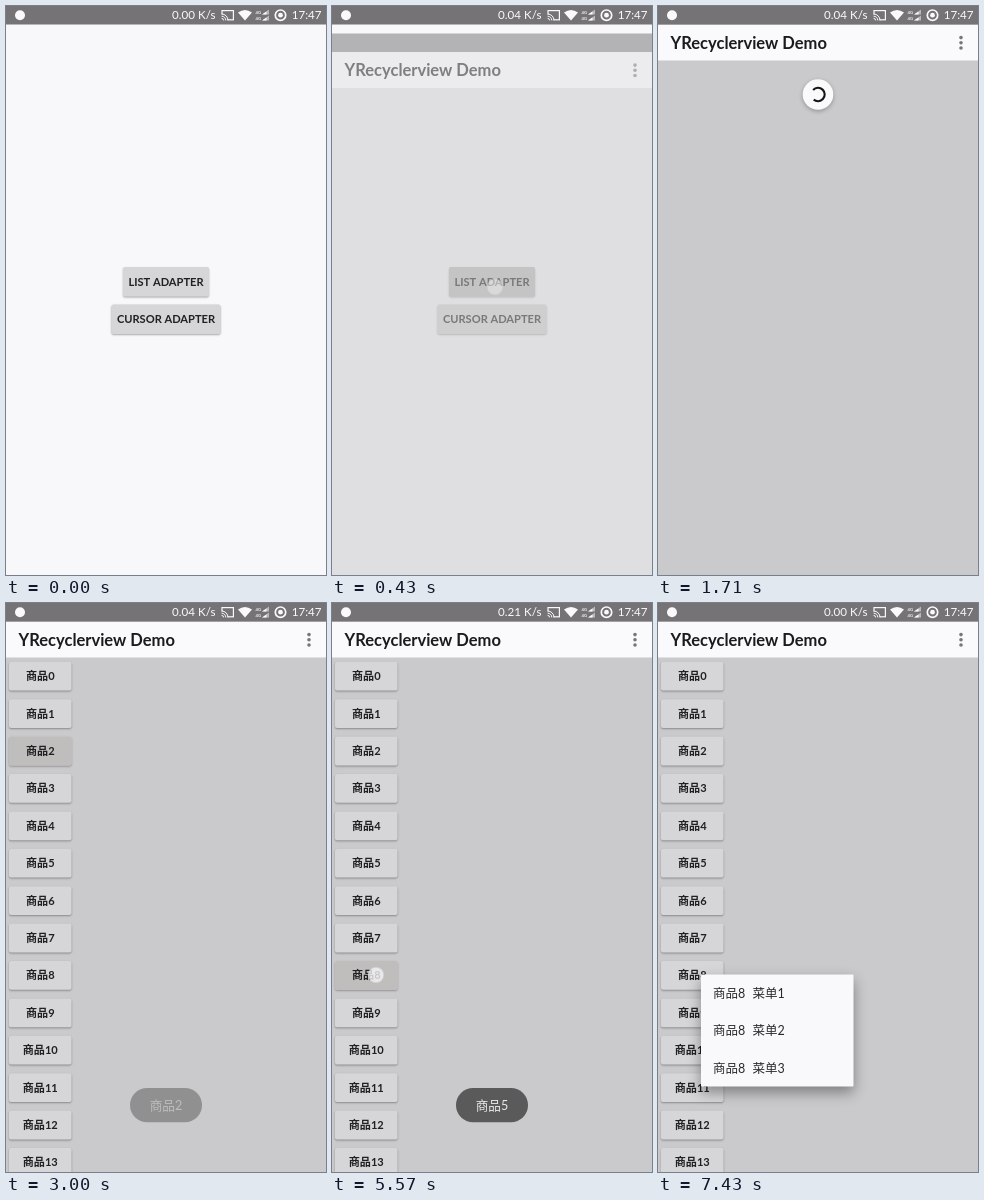
An HTML page with a canvas for the animation above (8000 ms loop, 320 by 569 pixels).

```html
<!DOCTYPE html>
<html lang="en">
<head>
<meta charset="utf-8">
<title>Recycler view demo</title>
<style>
  html, body { margin: 0; width: 100%; height: 100%; overflow: hidden; background: #f8f7fa; }
  canvas { display: block; width: 100vw; height: 100vh; }
</style>
</head>
<body>
<canvas id="stage"></canvas>
<script>
const W = 320, H = 569, LOOP = 8000, FPS = 7;
const FONT = 'Lato, "Noto Sans CJK SC", "Noto Sans CJK", sans-serif';
const canvas = document.getElementById('stage');
const ctx = canvas.getContext('2d');
const ratio = window.devicePixelRatio || 1;
canvas.width = W * ratio;
canvas.height = H * ratio;

const clamp = v => Math.min(1, Math.max(0, v));
const ramp = (t, start, length) => clamp((t - start) / length);
const during = (t, from, to) => t >= from && t < to;
const easeOut = (u, power) => 1 - (1 - u) ** power;
const smooth = u => u * u * (3 - 2 * u);

function group(draw, alpha = 1) {
  if (alpha <= 0) return;
  ctx.save();
  ctx.globalAlpha *= alpha;
  draw();
  ctx.restore();
}

function rect(x, y, w, h, color, radius = 0) {
  ctx.fillStyle = color;
  ctx.beginPath();
  ctx.roundRect(x, y, w, h, radius);
  ctx.fill();
}

function circle(x, y, r, color) {
  ctx.fillStyle = color;
  ctx.beginPath();
  ctx.arc(x, y, r, 0, 2 * Math.PI);
  ctx.fill();
}

function polygon(color, ...points) {
  ctx.fillStyle = color;
  ctx.beginPath();
  points.forEach(([x, y]) => ctx.lineTo(x, y));
  ctx.fill();
}

function arc(x, y, r, from, to, color, width) {
  ctx.strokeStyle = color;
  ctx.lineWidth = width;
  ctx.beginPath();
  ctx.arc(x, y, r, from, to);
  ctx.stroke();
}

function text(str, x, baseline, size, color, { weight = 400, align = 'left' } = {}) {
  ctx.font = `${weight} ${size}px ${FONT}`;
  ctx.textAlign = align;
  ctx.fillStyle = color;
  ctx.fillText(str, x, baseline);
}

function shadow(color, blur, dy) {
  ctx.shadowColor = color;
  ctx.shadowBlur = blur * ratio;
  ctx.shadowOffsetY = dy * ratio;
}

function button(label, x, y, w, h, press) {
  group(() => {
    shadow('rgba(0,0,0,.32)', 2, 1);
    rect(x, y, w, h, '#d6d5d7', 2);
  });
  group(() => rect(x, y, w, h, '#bdbcbb', 2), press);
  text(label, x + w / 2, y + h / 2 + 4, 11.1, '#212122', { weight: 700, align: 'center' });
}

function touchDot(x, y, alpha) {
  group(() => {
    circle(x, y, 8, '#f4f3f5');
    arc(x, y, 7.7, 0, 2 * Math.PI, '#bbb', .6);
  }, alpha);
}

function statusBar(t) {
  const white = '#fbfafb', faint = '#bab9ba';
  const speed = t < 400 || t >= 6400 ? '0.00' : t < 3400 ? '0.04' : '0.21';
  rect(0, 0, W, 18.5, '#757375');
  circle(14, 9.3, 5, white);
  text(speed + ' K/s', 209.5, 13.3, 11.6, white, { align: 'right' });

  // cast
  ctx.strokeStyle = white;
  ctx.lineWidth = 1.2;
  ctx.strokeRect(216, 4.6, 11.4, 9.2);
  rect(215, 8.5, 6.5, 6.5, '#757375');
  for (const r of [2, 4.2, 6.4]) arc(215.6, 14.4, r, -Math.PI / 2, 0, white, 1);

  // wifi
  ctx.fillStyle = white;
  ctx.beginPath();
  ctx.moveTo(239, 14.5);
  ctx.lineTo(232, 6.6);
  ctx.quadraticCurveTo(239, 1.6, 246, 6.6);
  ctx.fill();

  // two signal meters
  for (const y of [8.6, 14.6]) {
    text('4G', 249.5, y - .3, 4.2, white, { weight: 700 });
    polygon(faint, [256, y], [263, y], [263, y - 5]);
    polygon(white, [256, y], [260.5, y], [260.5, y - 3.2]);
  }
  arc(274.5, 9.2, 5.2, 0, 2 * Math.PI, white, 1.7);
  circle(274.5, 9.2, 2.4, white);
  text('17:47', 315.5, 13.3, 11.6, white, { align: 'right' });
}

function homeScreen(t) {
  rect(0, 0, W, H, '#f8f7fa');
  button('LIST ADAPTER', 117, 261, 86, 29.5, during(t, 280, 600) ? .9 : 0);
  button('CURSOR ADAPTER', 105.5, 298.5, 109, 29.5, 0);
}

function spinner(t) {
  const scale = ramp(t, 530, 180) * (1 - ramp(t, 1790, 150));
  if (!scale) return;
  const cycle = ((t - 857) / 1332 + 1) % 1;
  const head = .8 * smooth(clamp(cycle * 2));
  const tail = .8 * smooth(clamp(cycle * 2 - 1));
  const start = ((t - 1714) / 1332 * .6 + tail - .54) * 2 * Math.PI;
  const sweep = (head - tail + .1) * 2 * Math.PI;
  group(() => {
    ctx.translate(160, 88.5);
    ctx.scale(scale, scale);
    group(() => {
      shadow('rgba(0,0,0,.28)', 4, 1.5);
      circle(0, 0, 15.3, '#fafafb');
    });
    arc(0, 0, 6.7, start, start + sweep, '#151515', 2.1);
  });
}

function pressOf(item, t) {
  const [from, release, fade] = {
    2: [2700, 3010, 280],
    5: [3850, 4010, 220],
    8: [5420, 6250, 250]
  }[item] || [Infinity, 0, 1];
  return t < from ? 0 : .9 * (1 - ramp(t, release, fade));
}

function listScreen(t) {
  rect(0, 0, W, 18.5, '#757375');
  rect(0, 18.5, W, H, '#cac9cb');
  rect(0, 18.5, W, 36, '#fafafc');
  text('YRecyclerview Demo', 12.5, 42.5, 16.5, '#1b1b1c', { weight: 700 });
  for (const y of [31.6, 36.8, 42]) circle(303, y, 1.8, '#777678');
  if (t >= 1850) {
    for (let i = 0; i < 14; i++) {
      button('商品' + i, 3, 58.8 + 37.4 * i, 62.5, 28.8, pressOf(i, t));
    }
  }
  spinner(t);
}

function popup(t) {
  const u = ramp(t, 5950, 300);
  if (!u) return;
  const open = easeOut(u, 3);
  const shift = 60 * (1 - open);
  const x = 43 - shift / 3, y = 371.5 - shift / 3;
  const w = 152.5 * open + shift / 3, h = 112 * open + shift / 3;
  group(() => {
    group(() => {
      shadow('rgba(0,0,0,.38)', 14, 6);
      rect(x, y, w, h, '#f9f8fb', 1);
    });
    ctx.beginPath();
    ctx.rect(x, y, w, h);
    ctx.clip();
    for (let i = 0; i < 3; i++) {
      const baseline = 395 + 37.4 * i - shift;
      text('商品8', 55 - shift, baseline, 12.5, '#29292a');
      text('菜单' + (i + 1), 94.5 - shift, baseline, 12.5, '#29292a');
    }
  }, ramp(t, 5950, 90));
}

function toast(label, t, shown, hidden) {
  const alpha = ramp(t, shown, 280) * (1 - ramp(t, hidden, 460));
  group(() => {
    rect(124, 485, 72, 34.3, '#5b5a5b', 17.1);
    text(label, 160, 507, 12.6, '#e9e8ea', { align: 'center' });
  }, alpha);
}

function render(t) {
  ctx.setTransform(ratio * 1, 0, 0, ratio, 0, 0);
  if (t < 700) homeScreen(t);
  const slide = 45.5 * (1 - easeOut(ramp(t, 395, 350), 5));
  group(() => {
    ctx.translate(0, slide);
    listScreen(t);
  }, easeOut(ramp(t, 395, 200), 4));
  statusBar(t);

  popup(t);
  toast('商品2', t, 2857, 4770);
  toast('商品5', t, 4990, 6920);

  if (during(t, 280, 500)) touchDot(163, 281, .45);
  if (during(t, 2700, 2900)) touchDot(44, 149, .6);
  if (during(t, 3850, 4050)) touchDot(44, 262, .6);
  if (during(t, 5420, 6250)) touchDot(44, 372, .8);
}

const origin = performance.now();
function tick() {
  const elapsed = (performance.now() - origin) % LOOP;
  render(Math.floor((elapsed + 5) * FPS / 1000) * 1000 / FPS % LOOP);
  requestAnimationFrame(tick);
}
tick();
</script>
</body>
</html>
```
